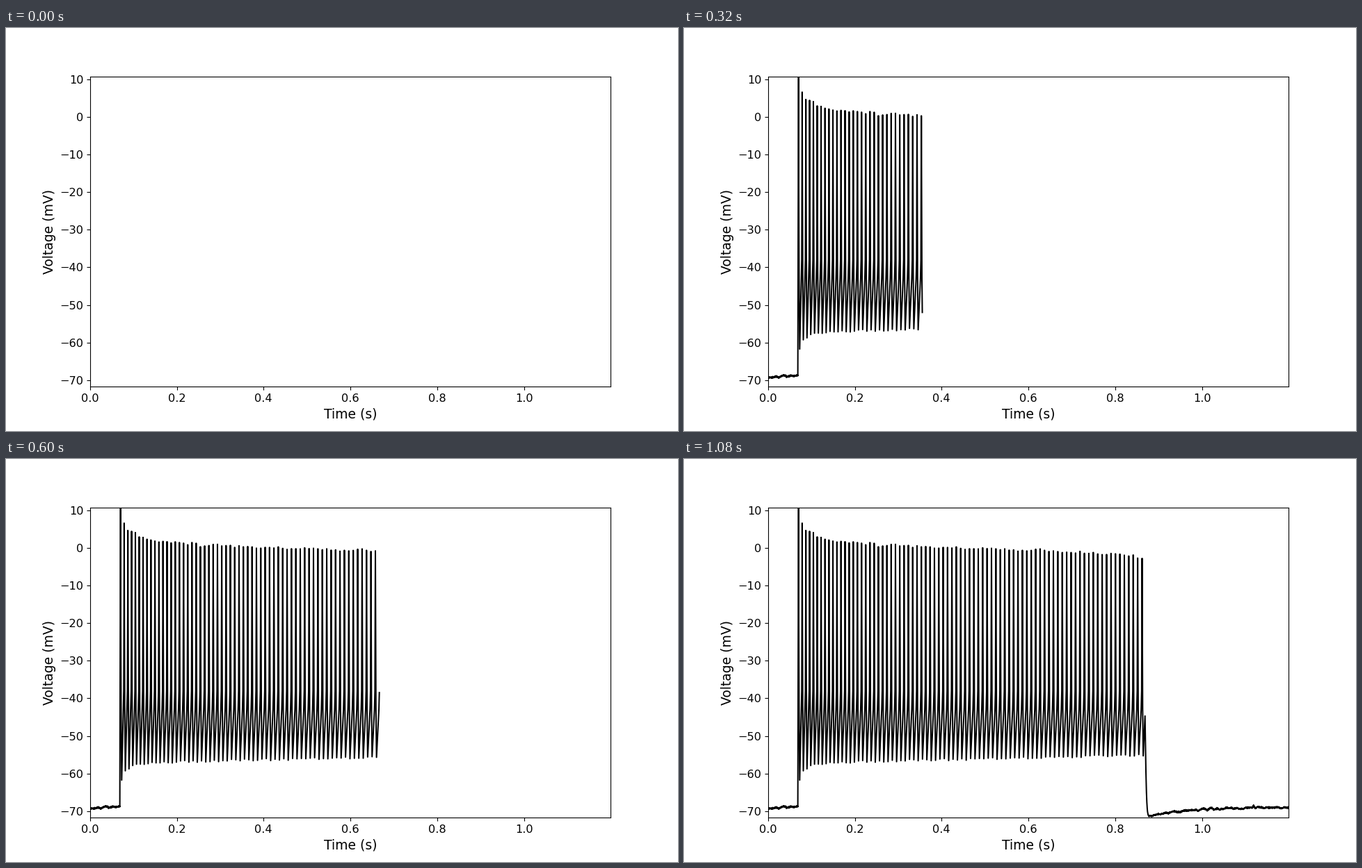
A matplotlib script for the animation above (1.12 s loop, 966x580 px).

```python
import numpy as np
import matplotlib.pyplot as plt
from matplotlib.animation import FuncAnimation

FRAMES, INTERVAL, T_END = 28, 40, 1200  # trace time in ms
ON, OFF, SPIKES = 69, 868.7, 81
STEP = 0.3
rng = np.random.default_rng(4)


def noise(size):
    """Fine recording noise on a slow wander."""
    win = np.hanning(42)
    wander = np.convolve(rng.normal(size=size), win / np.linalg.norm(win), "same")
    return 0.14 * wander + rng.normal(0, 0.1, size)


def rest():
    t = np.arange(0, ON, STEP)
    return t, -69.3 + 0.5 * t / ON + noise(len(t))


def spike_train():
    """Fast spike, quick fall to the trough, slow ramp to the next spike."""
    n = np.arange(SPIKES)
    at = 70.4 + 10.234 * n - 27.25 * (1 - np.exp(-n / 14))
    top = (1.7 - 0.045 * n + 5.5 * np.exp(-n / 4) + 8 * np.exp(-3 * n)
           - 1.4 * np.exp((n - SPIKES) / 2) + rng.normal(0, 0.25, SPIKES))
    dip = (-57.3 + 0.028 * n - 2.4 * np.exp(-n / 3) - 1.9 * np.exp(-3 * n)
           + rng.uniform(-0.3, 0.3, SPIKES))
    pts = []
    for i, (t, high, low) in enumerate(zip(at, top, dip)):
        if i:
            pts += [(t - 2.1, -43), (t - 1, -38), (t - 0.4, -18)]
        pts += [(t, high), (t + 0.55, -20), (t + 1.3, -43), (t + 2.6, low)]
    return np.array(pts).T


def recovery():
    """Steep drop below rest, then a slow return with one small blip."""
    t = np.arange(OFF, T_END + STEP, STEP)
    s = t - OFF
    drop = 27 * np.exp(-(s / 2.5) ** 1.25)
    blip = 0.7 * np.exp(-((t - 1119) / 2) ** 2)
    settled = np.clip(s / 10, 0, 1)
    return t, -69.1 - 2.6 * np.exp(-s / 75) + drop + blip + settled * noise(len(t))


time, volt = np.hstack([rest(), spike_train(), recovery()])

fig, ax = plt.subplots(figsize=(9.66, 5.8), dpi=100)
fig.subplots_adjust(top=0.879)
ax.set_xlim(0, T_END / 1000)
ax.set_ylim(-71.74, 10.65)
ax.set_xticks(np.arange(0, 1.1, 0.2))
ax.set_yticks(np.arange(-70, 11, 10))
ax.tick_params(labelsize=11.6, length=3.4, pad=3.4)
ax.set_xlabel("Time (s)", fontsize=13.52, labelpad=3.9)
ax.set_ylabel("Voltage (mV)", fontsize=13.52, labelpad=3.9)
trace, = ax.plot([], [], color="black", lw=1.45)


def update(i):
    end = T_END * i / (FRAMES - 1)
    seen = time < end
    t = np.append(time[seen], end)
    v = np.append(volt[seen], np.interp(end, time, volt))
    trace.set_data(t / 1000, v)
    return trace,


anim = FuncAnimation(fig, update, frames=FRAMES, interval=INTERVAL,
                     repeat=True, repeat_delay=0)
plt.show()
```
